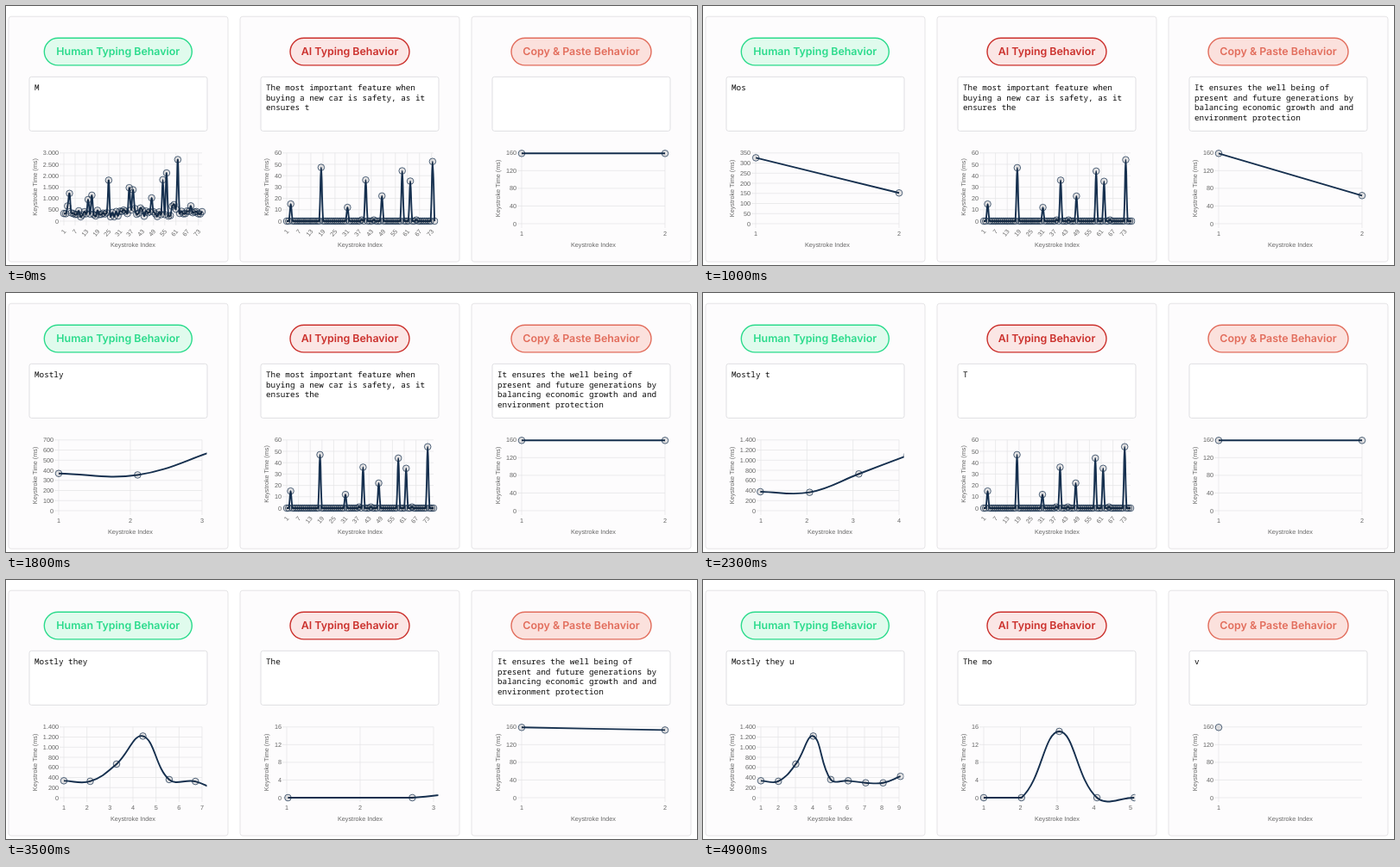
An HTML page that plays this animation: 800x301 px, repeating every 5 s.

```html
<!DOCTYPE html>
<html lang="en">
<head>
<meta charset="utf-8">
<title>Typing behavior</title>
<style>
  html, body { margin: 0; width: 100%; height: 100%; overflow: hidden; background: #fff; }
  svg { display: block; width: 800px; height: 301px; text-rendering: geometricPrecision; }
  .axis { font: 7.25px "Liberation Sans", Arial, sans-serif; fill: #666; }
  .typed { font: 9.3px "Noto Sans Mono", "DejaVu Sans Mono", monospace; fill: #0c0c0c; white-space: pre; }
  .title { font: 600 12.4px Inter, "Open Sans", sans-serif; text-anchor: middle; }
  .grid { stroke: #e4e4e5; stroke-width: .7; fill: none; }
  .line { stroke: #16304f; stroke-width: 1.9; fill: none; stroke-linejoin: round; }
  .dot { stroke: #16304f; stroke-width: .85; fill: #000; fill-opacity: .1; stroke-opacity: .85; }
</style>
</head>
<body>
<svg id="stage" viewBox="0 0 800 301" xmlns="http://www.w3.org/2000/svg"></svg>
<script>
const LOOP = 5000, STEP = 100, ANIM = 1000, BEFORE = -3000;
const TOP = 170.8, RIGHT = 224;

const lerp = (a, b, p) => a + (b - a) * p;
const clamp = (v, lo, hi) => Math.min(Math.max(v, lo), hi);
const easeOut = p => 1 - Math.pow(1 - clamp(p, 0, 1), 4);
const fix = v => v.toFixed(2);

let seed = 11;
const random = () => (seed = (seed * 16807) % 2147483647) / 2147483647;

// Evenly spaced updates that each add one keystroke to the chart.
const keys = (start, gap, from, to) =>
  Array.from({ length: to - from + 1 }, (_, i) => [start + i * gap, from + i]);

// A person: an uneven rhythm with a few long pauses.
const HUMAN = { start: 345, gap: 509, text: "Mostly they u" };
const opening = [335, 325, 665, 1220, 360, 335, 295, 295, 455];
const pauses = { 13: 950, 15: 1140, 24: 1800, 35: 1470, 37: 1380, 53: 1820, 55: 2120, 61: 2710 };
const humanValues = Array.from({ length: 75 }, (_, i) =>
  opening[i] ?? pauses[i] ?? 190 + random() * 260 + 600 * random() ** 8);

function humanText(t) {
  const n = Math.max(0, Math.floor((t - HUMAN.start) / HUMAN.gap) + 1);
  return HUMAN.text.slice(0, n < 3 ? n + 1 : n + 4);
}

// A generator: instant keystrokes, pausing only where a word ends.
const AI = { start: 2412, gap: 503 };
const essay = "The most important feature when\nbuying a new car is safety, as it\nensures the";
const wordPauses = [15, 0, 47, 0, 12, 1, 36, 1, 22, 0, 44, 35, 1, 54];
const aiValues = Array(76).fill(0);
[...essay.matchAll(/\W+/g)].forEach((m, i) => { aiValues[m.index - 1] = wordPauses[i]; });
const aiEnding = keys(HUMAN.start - 2 * HUMAN.gap, HUMAN.gap, 73, 76);

function aiText(t) {
  const n = Math.floor((t - AI.start) / AI.gap) + 1;
  const shown = n >= 0 ? n : aiEnding.filter(([at]) => at <= t).pop()[1];
  return essay.slice(0, shown + 1);
}

// Pasting: a single key, then the whole paragraph, then an empty box.
const PASTE = { period: 2060, key: 350, paste: 880, clear: 1930 };
const pasted = "It ensures the well being of\npresent and future generations by\nbalancing economic growth and and\nenvironment protection";
const pasteSteps = [0, 1, 2].flatMap(i => [
  [PASTE.key + i * PASTE.period, 1], [PASTE.paste + i * PASTE.period, 2]
]);

function pasteText(t) {
  const u = (t - PASTE.key + PASTE.period) % PASTE.period + PASTE.key;
  return u < PASTE.paste ? "v" : u < PASTE.clear ? pasted : "";
}

// steps: [time, number of keystrokes charted]
const panels = [
  {
    x: 3, title: "Human Typing Behavior", pill: [44.3, 171], ink: "#2bdb8c", tint: "#e0fbed",
    values: humanValues, typed: humanText,
    steps: [[BEFORE, 75], ...keys(HUMAN.start, HUMAN.gap, 1, 9)]
  },
  {
    x: 271, title: "AI Typing Behavior", pill: [329, 138], ink: "#cb302c", tint: "#fbe6e5",
    values: aiValues, typed: aiText,
    steps: [[BEFORE, 72], ...aiEnding, ...keys(AI.start, AI.gap, 1, 5)]
  },
  {
    x: 539, title: "Copy &amp; Paste Behavior", pill: [585, 162], ink: "#e26d5c", tint: "#fbe1dd",
    values: [159, 159], typed: pasteText,
    steps: [[BEFORE, 2], ...pasteSteps]
  }
];

function frameOf(p, i) {
  const [px, pw] = p.pill;
  return `<rect x="${p.x}" y="12.2" width="254" height="285" rx="3" fill="#fdfcfd" stroke="#e3e1e4" stroke-width=".9"/>
    <rect x="${px}" y="37.3" width="${pw}" height="31.6" rx="15.8" fill="${p.tint}" stroke="${p.ink}" stroke-width="1.4"/>
    <text class="title" x="${px + pw / 2}" y="57.2" fill="${p.ink}">${p.title}</text>
    <rect x="${p.x + 24}" y="82.3" width="206" height="63" rx="2.5" fill="#fff" stroke="#dcdcdf" stroke-width=".9"/>
    <text class="typed" id="typed${i}"></text>
    <clipPath id="clip${i}"><rect x="${p.x + 24}" y="160" width="205.5" height="130"/></clipPath>
    <g id="chart${i}" clip-path="url(#clip${i})"></g>`;
}

function niceStep(raw) {
  const unit = 10 ** Math.floor(Math.log10(raw));
  return unit * [1, 2, 5, 10].find(n => raw / unit <= n + 1e-9);
}

function tickText(v, step) {
  if (v === 0) return "0";
  if (step < 1) return v.toFixed(1).replace(".", ",");
  return v >= 1000 ? Math.floor(v / 1000) + "." + String(v % 1000).padStart(3, "0") : String(v);
}

function axisOf(p, count) {
  const peak = Math.max(...p.values.slice(0, count)) || 1;
  let step = niceStep(peak / 10);
  const max = Math.ceil(peak / step - 1e-9) * step;
  if (max / step > 7.5) step *= 2;
  const labelWidth = [...tickText(max, step)].reduce((w, c) => w + (/\d/.test(c) ? 4 : 2), 0);
  const left = p.x + 46 + labelWidth, right = p.x + RIGHT, dense = count > 20;
  return {
    count, max, step, left, right, dense, bottom: dense ? 250 : 253,
    gap: count > 1 ? (right - left) / (count - 1) : 0
  };
}

const toY = (axis, v) => axis.bottom - (axis.bottom - TOP) * v / axis.max;

// Replays the updates up to time t; every update restarts the easing from the current pose.
function poseAt(p, t) {
  let pts = [], axis = null, start = 0;
  const settle = now => {
    const k = easeOut((now - start) / ANIM);
    return pts.map(q => ({ x: lerp(q.x, q.tx, k), y: lerp(q.y, q.ty, k) }));
  };
  for (const [at, count] of p.steps) {
    if (at > t) break;
    const now = settle(at), old = axis;
    axis = axisOf(p, count);
    pts = p.values.slice(0, count).map((v, i) => {
      const tx = axis.left + i * axis.gap, ty = toY(axis, v);
      const fresh = { x: old && old.gap ? old.left + i * old.gap : tx, y: axis.bottom };
      return { ...(now[i] || fresh), tx, ty };
    });
    start = at;
  }
  return { axis, pts: settle(t) };
}

// Smooth line whose handles stay inside the plot area.
function curve(pts, a) {
  const inside = q => q && q.x > a.left - .5 && q.x < a.right + .5 && q.y > TOP - .5 && q.y < a.bottom + .5;
  const cap = c => ({ x: clamp(c.x, a.left, a.right), y: clamp(c.y, TOP, a.bottom) });
  const ctrl = pts.map((q, i) => {
    const prev = pts[i - 1] || q, next = pts[i + 1] || q;
    const d0 = Math.hypot(q.x - prev.x, q.y - prev.y), d1 = Math.hypot(next.x - q.x, next.y - q.y);
    const sum = d0 + d1 || 1, dx = next.x - prev.x, dy = next.y - prev.y;
    const f0 = .4 * d0 / sum, f1 = .4 * d1 / sum;
    let before = { x: q.x - f0 * dx, y: q.y - f0 * dy };
    let after = { x: q.x + f1 * dx, y: q.y + f1 * dy };
    if (inside(q)) {
      if (inside(pts[i - 1])) before = cap(before);
      if (inside(pts[i + 1])) after = cap(after);
    }
    return { before, after };
  });
  const at = q => fix(q.x) + " " + fix(q.y);
  return pts.map((q, i) => i
    ? `C${at(ctrl[i - 1].after)} ${at(ctrl[i].before)} ${at(q)}`
    : "M" + at(q)).join("");
}

function drawAxes(p, a) {
  let grid = "", text = "";
  const rows = Math.round(a.max / a.step);
  for (let r = 0; r <= rows; r++) {
    const v = r * a.step, y = toY(a, v);
    grid += `M${a.left - 5} ${fix(y)}H${a.right}`;
    text += `<text x="${a.left - 6}" y="${fix(y + 2.5)}" text-anchor="end">${tickText(v, a.step)}</text>`;
  }
  for (let i = 0; i < a.count; i += a.dense ? 6 : 1) {
    const x = a.left + i * a.gap;
    grid += `M${fix(x)} ${TOP}V${a.bottom + 5}`;
    text += a.dense
      ? `<text transform="translate(${fix(x + 1)} 260.5) rotate(-50)" y="2.5" text-anchor="end">${i + 1}</text>`
      : `<text x="${fix(x)}" y="267.2" text-anchor="middle">${i + 1}</text>`;
  }
  const mid = (a.left + a.right) / 2;
  text += `<text x="${mid}" y="280.3" text-anchor="middle">Keystroke Index</text>
    <text transform="translate(${p.x + 32.8} ${(TOP + a.bottom) / 2}) rotate(-90)" text-anchor="middle">Keystroke Time (ms)</text>`;
  return `<path class="grid" d="${grid}"/><g class="axis">${text}</g>`;
}

function drawChart(p, t) {
  const { axis, pts } = poseAt(p, t);
  const dots = pts.map(q => `<circle class="dot" cx="${fix(q.x)}" cy="${fix(q.y)}" r="3.8"/>`).join("");
  return drawAxes(p, axis) + `<path class="line" d="${curve(pts, axis)}"/>` + dots;
}

const drawText = (p, t) => p.typed(t).split("\n").map((s, i) =>
  `<tspan x="${p.x + 30}" y="${fix(98 + i * 11.7)}">${s}</tspan>`).join("");

const byId = id => document.getElementById(id);
byId("stage").innerHTML = panels.map(frameOf).join("");

let shown = -1;
function render(t) {
  if (t === shown) return;
  shown = t;
  panels.forEach((p, i) => {
    byId("typed" + i).innerHTML = drawText(p, t);
    byId("chart" + i).innerHTML = drawChart(p, t);
  });
}

const begin = performance.now();
function tick() {
  const elapsed = performance.now() - begin + 10;
  render(Math.floor(elapsed % LOOP / STEP) * STEP);
  requestAnimationFrame(tick);
}
render(0);
requestAnimationFrame(tick);
</script>
</body>
</html>
```
